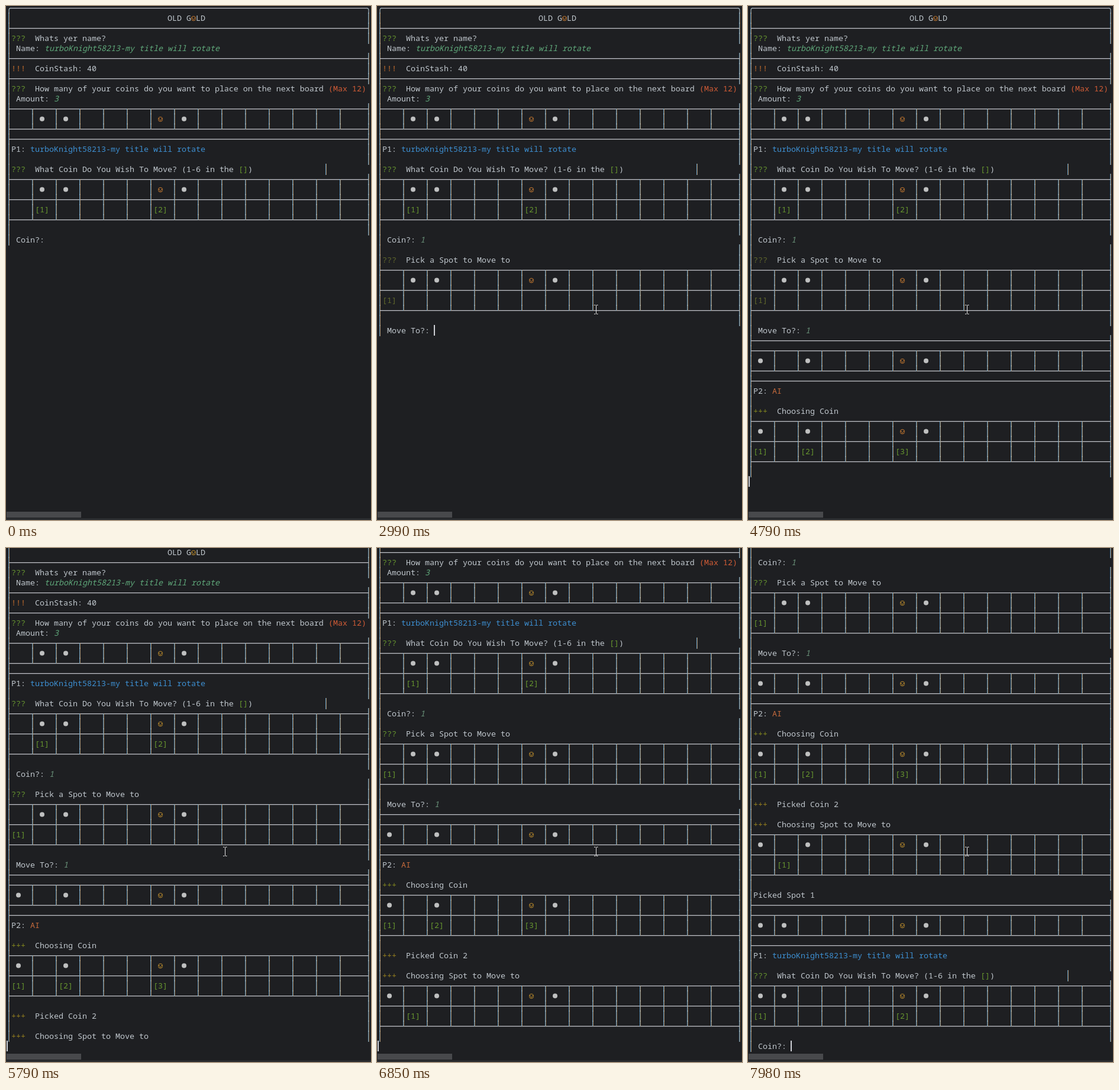
An HTML page for the animation above (8000 ms loop, 617 by 867 pixels).

```html
<!DOCTYPE html>
<html lang="en">
<head>
<meta charset="utf-8">
<title>Coin game terminal</title>
<style>
  html, body { margin: 0; width: 100%; height: 100%; overflow: hidden; background: #1e1f22; }
  svg { display: block; width: 617px; height: 867px; }
  text { font: 500 13.3333px "Noto Sans Mono", "DejaVu Sans Mono", monospace; white-space: pre; }
  .cool { fill: #6eb4e6; fill-opacity: .78; }
  .warm { fill: #c89b68; fill-opacity: .72; }
  .rule { fill: #bcbec4; }
  .gold { fill: none; stroke: var(--gold); }
  .beam { fill: none; stroke: #e4e4e4; }
</style>
</head>
<body>
<svg id="stage" viewBox="0 0 617 867">
  <defs>
    <clipPath id="view"><rect width="617" height="863"/></clipPath>
    <path id="face" d="M-3.5 -.5a3.5 3.3 0 0 1 7 0M-3.5 .5a3.5 3.3 0 0 0 7 0M-4 -.5h3M1 -.5h3M-1.6 1.2q1.6 1.4 3.2 0"/>
  </defs>
  <g clip-path="url(#view)">
    <g id="page"></g>
    <rect id="caret" width="2" height="18" fill="#ced0d6"/>
  </g>
  <rect x="1" y="853" width="126" height="10" fill="#fff" fill-opacity=".19"/>
  <rect y="864" width="617" height="3" fill="#2b2d30"/>
  <path id="mouse" class="beam" d="M-3 -7.5h2.5M1 -7.5h2.5M-3 7.5h2.5M1 7.5h2.5M.5 -7v14"/>
</svg>
<script>
const LOOP = 8000, ROW = 17, COL = 8, EDGE = 76, FLOOR = 831;
const FG = '#c0c7cd', GREEN = '#67962f', DIM = 'var(--dim)', OLIVE = '#84891f', AMBER = '#96801f',
      ORANGE = '#b8682c', RED = '#cf5b36', BLUE = '#3d8fd1', INPUT = '#5fa87a', TYPED = '#6a9279';
const PLAYER = 'turboKnight58213-my title will rotate';

const $ = id => document.getElementById(id);
const page = $('page'), rows = [], prompts = [];
let born = 0, scrolled = 0;

// Rows added after this call appear at time t and move the view at time s.
function print(t, s = t) { born = t; scrolled = s; }

function el(name, attrs, parent) {
  const e = document.createElementNS('http://www.w3.org/2000/svg', name);
  for (const k in attrs) e.setAttribute(k, attrs[k]);
  parent.appendChild(e);
  return e;
}

function bar(g, col, top = -6, bottom = 13) {
  ['cool', 'warm'].forEach((tone, i) =>
    el('rect', { class: tone, x: COL * col + 4 + i, y: top, width: 1, height: bottom - top }, g));
}

function label(g, [col, str, fill = FG, italic]) {
  const e = el('text', { x: 1 + COL * col, y: 8 }, g);
  e.textContent = str;
  e.style.fill = fill;
  if (italic) e.style.fontStyle = 'italic';
  return e;
}

function face(g, col) {
  el('use', { href: '#face', class: 'gold', x: 5 + COL * col, y: 4 }, g);
}

function row(runs = [], edge = EDGE) {
  const g = el('g', { transform: `translate(0 ${ROW * rows.length})` }, page);
  bar(g, 0);
  if (edge) bar(g, edge);
  runs.forEach(r => label(g, r));
  rows.push({ g, born, scrolled });
  return g;
}

function rule(top, bottom) {
  const g = row();
  el('rect', { class: 'rule', x: 5, y: 3, width: 608, height: 1.3 }, g);
  if (bottom) for (let c = 5; c <= 70; c += 5) bar(g, c, top, bottom);
}

function cells() {
  const g = row();
  for (let c = 5; c <= 70; c += 5) bar(g, c);
  return g;
}

function board(coins, tags, color = GREEN) {
  rule(3, 13);
  const g = cells();
  coins.forEach(c => el('circle', { cx: 40 * c + 21, cy: 3.5, r: 4, fill: '#bfc0c0' }, g));
  face(g, 32);
  if (tags) {
    rule(-6, 13);
    const t = cells();
    tags.forEach((c, i) => label(t, [5 * c + 1, `[${i + 1}]`, color]));
  }
  rule(-6, 4);
}

// A question that keeps the caret until the answer and then Enter are typed.
function prompt(str, key = LOOP, enter = LOOP) {
  const line = rows.length, col = str.length + 3;
  const g = row([[2, str]], 0);
  const answer = label(g, [col, '1', TYPED, true]);
  prompts.push({ line, col, answer, from: born, key, enter });
}

const note = (mark, color, str) => row([[1, mark, color], [6, str]]);
const turn = (who, name, color) => { row([[1, who + ':'], [5, name, color]]); row(); };

function askCoin(coins, tags, key, enter) {
  row([[1, '???', GREEN], [6, 'What Coin Do You Wish To Move? (1-6 in the '], [49, '[]', GREEN], [51, ')']], 67);
  board(coins, tags);
  row();
  prompt('Coin?:', key, enter);
}

function header() {
  const g = el('g', {}, page);
  el('rect', { class: 'rule', x: 8, y: 3, width: 602, height: 1.3 }, g);
  el('path', { d: 'M5 13V7Q5 3.5 8.5 3.5M613 13V7Q613 3.5 609.5 3.5', fill: 'none', stroke: '#9aa9b3', 'stroke-width': 1.3 }, g);
  rows.push({ g, born, scrolled });
  face(row([[34, 'OLD G'], [40, 'LD']]), 39);
  rule();
}

header();
note('???', GREEN, 'Whats yer name?');
row([[2, 'Name:'], [8, PLAYER, INPUT, true]], 0);
rule();
note('!!!', ORANGE, 'CoinStash: 40');
rule();
row([[1, '???', GREEN], [6, 'How many of your coins do you want to place on the next board'], [68, '(Max 12)', RED]], 0);
row([[2, 'Amount:'], [10, '3', INPUT, true]], 0);
board([1, 2, 7]);
rule();
turn('P1', PLAYER, BLUE);
askCoin([1, 2, 7], [1, 6], 2460, 2580);

print(2580);
row();
note('???', DIM, 'Pick a Spot to Move to');
print(2990);
board([1, 2, 7], [0], DIM);
row();
prompt('Move To?:', 3460, 3590);

print(3590);
rule();
board([0, 2, 7]);
rule();
turn('P2', 'AI', '#c56a3c');
rows.pop().g.remove();
print(4790);
row();
note('+++', OLIVE, 'Choosing Coin');
board([0, 2, 7], [0, 2, 6]);
row();

print(5720, 5790);
note('+++', AMBER, 'Picked Coin 2');
row();
note('+++', AMBER, 'Choosing Spot to Move to');
print(6720);
board([0, 2, 7], [1]);
row();

print(7720);
row([[1, 'Picked Spot 1']], 0);
rule();
board([0, 1, 7]);
rule();
turn('P1', PLAYER, BLUE);
rows.pop().g.remove();
print(7850, 7920);
row();
askCoin([0, 1, 7], [0, 6]);

const hidden = [[0, 550], [2110, 2460], [4190, 4650], [6720, 6850], [7850, 7980]];
const sweeps = [
  { from: 120, to: 910, pts: [[557, 858], [200, 280], [76, 396]] },
  { from: 1120, to: 1580, pts: [[64, 402], [171, 460], [370, 512]] }
];

function mouseAt(t) {
  const q = t >= 1580 ? t : 120 + Math.floor((t - 120) / 70) * 70;
  const { from, to, pts: [a, b, c] } = sweeps[q < sweeps[1].from ? 0 : 1];
  const u = Math.min(1, (q - from) / (to - from)), v = 1 - u;
  return [0, 1].map(i => Math.round(v * v * a[i] + 2 * u * v * b[i] + u * u * c[i]));
}

function draw(t) {
  const show = (e, on) => e.style.display = on ? '' : 'none';
  rows.forEach(r => show(r.g, t >= r.born));
  prompts.forEach(p => show(p.answer, t >= p.key));

  const open = prompts.find(p => t >= p.from && t < p.enter);
  const settled = rows.filter(r => t >= r.scrolled).length;
  const lineAt = n => open && open.line < n ? open.line : n;
  const scroll = Math.max(0, ROW * lineAt(settled) - 6 - FLOOR);
  page.setAttribute('transform', `translate(0 ${-scroll})`);

  const late = t >= 5720, style = $('stage').style;
  style.setProperty('--gold', late ? '#b98a2c' : '#c4782f');
  style.setProperty('--dim', late ? GREEN : '#626a2c');

  const caret = $('caret');
  const line = lineAt(rows.filter(r => t >= r.born).length);
  const col = open ? open.col + (t >= open.key) : 0;
  show(caret, !hidden.some(([a, b]) => t >= a && t < b));
  caret.setAttribute('x', Math.max(1, COL * col));
  caret.setAttribute('y', ROW * line - 6 - scroll);

  const mouse = $('mouse');
  show(mouse, t >= 120);
  if (t >= 120) mouse.setAttribute('transform', `translate(${mouseAt(t)})`);
}

const start = performance.now();
function tick() {
  draw((performance.now() - start) % LOOP);
  requestAnimationFrame(tick);
}
tick();
</script>
</body>
</html>
```
